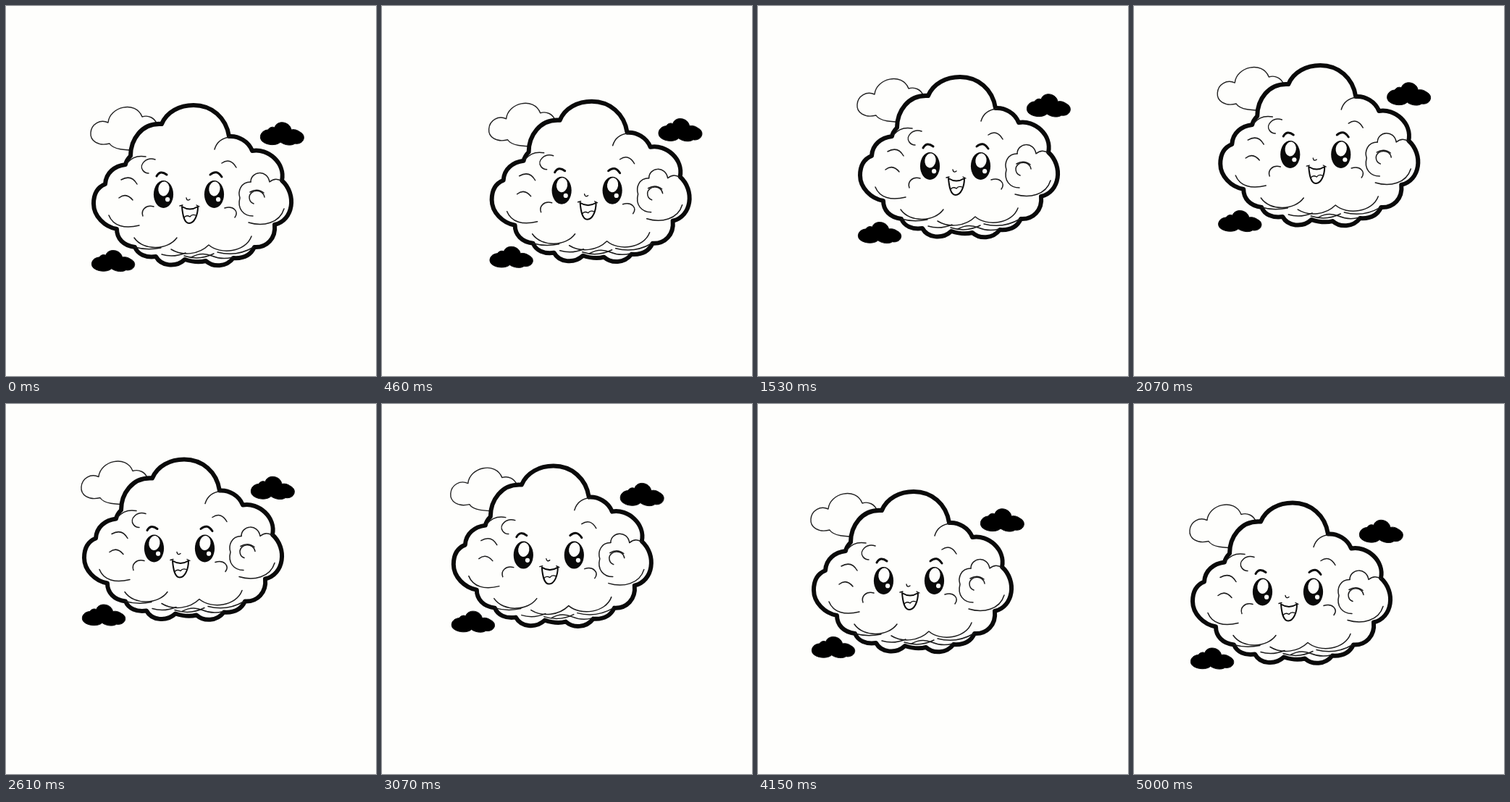
Write an HTML page that moves like this. It is 511 by 511 pixels and loops after 5070 ms.

```html
<!DOCTYPE html>
<html lang="en">
<head>
<meta charset="utf-8">
<title>Drifting cloud</title>
<style>
  html, body { margin: 0; width: 100%; height: 100%; overflow: hidden; background: #fefefc; }
  svg { display: block; width: 100vw; height: 100vh; }
  path { stroke: #0a0a0a; stroke-linecap: round; stroke-linejoin: round; }
  .small path { fill: #fefefc; stroke: #222; stroke-width: 1.4; }
  .body { fill: #fefefc; stroke-width: 6; }
  .folds path { fill: none; stroke: #1c1c1c; stroke-width: 1.5; }
  .brow { fill: none; stroke-width: 3; }
  .mouth { fill: #fefefc; stroke-width: 2; }
  .thin { fill: none; stroke-width: 1.3; }
  .shine { fill: #fefefc; }
</style>
</head>
<body>
<svg viewBox="0 0 511 511">
  <defs>
    <path id="puff" d="M362 171C353 171 348 181 354 187C361 193 374 193 379 188C386 193 395 193 399 190C411 192 416 179 406 174C402 171 398 170 394 171C392 159 374 157 371 168C368 166 363 168 362 171Z"/>
    <g id="eye">
      <ellipse rx="13.6" ry="19" fill="#0a0a0a"/>
      <ellipse class="shine" cx="-.6" cy="-7.5" rx="7.6" ry="10" transform="rotate(8)"/>
      <circle class="shine" cx="5.6" cy="7.2" r="3.1"/>
    </g>
  </defs>
  <g id="scene">
    <g class="small">
      <path d="M141 161C143 139 179 130 188 153C197 150 205 155 208 162L190 200C172 199 149 200 143 190C127 194 116 186 117 175C118 163 130 156 141 161Z"/>
      <use href="#puff"/>
      <use href="#puff" transform="translate(-229.5 188) scale(.99 .93)"/>
    </g>

    <path class="body" d="M215 163C222 146 240 137 259 137C284 137 304 154 308 180C321 179 335 187 340 200C362 196 386 217 381 241C402 260 397 296 371 302C373 321 360 334 343 333C338 344 328 349 314 348C304 361 286 361 276 352C265 355 256 353 247 350C234 362 214 359 207 346C193 348 182 343 178 333C162 331 153 321 153 308C136 305 121 290 121 273C121 259 127 250 137 246C138 230 150 221 165 219C166 214 169 210 172 207C172 185 187 161 215 163Z"/>

    <g class="folds">
      <path d="M167 217Q177 205 193 208"/>
      <path d="M206 212C194 208 183 219 189 227Q192 231 197 231"/>
      <path d="M159 240Q173 232 181 246"/>
      <path d="M156 265Q166 257 175 268"/>
      <path d="M204 277C193 274 186 282 189 290"/>
      <path d="M142 289C148 304 164 308 184 303"/>
      <path d="M177 320C190 339 224 337 236 320"/>
      <path d="M178 333Q195 338 214 334"/>
      <path d="M228 336C244 346 267 343 280 330C296 344 331 340 339 318"/>
      <path d="M215 343Q231 348 248 341"/>
      <path d="M246 345Q267 352 287 342"/>
      <path d="M256 347Q270 339 284 345T313 347"/>
      <path d="M292 340Q318 347 342 333"/>
      <path d="M288 198C291 188 298 182 310 181" stroke-width="2.2"/>
      <path d="M298 217Q310 209 318 223"/>
      <path d="M302 279C314 275 322 284 316 292"/>
      <path d="M338 243C338 228 361 225 364 243Q372 236 381 242"/>
      <path d="M338 243C324 243 320 256 323 265C319 280 328 290 341 290"/>
      <path d="M357 264C355 252 337 253 336 264Q336 271 342 273"/>
      <path d="M337 257Q347 251 356 258"/>
      <path d="M335 299C355 305 378 300 384 280"/>
    </g>

    <path class="brow" d="M208 235Q213 226 222 233"/>
    <path class="brow" d="M282 233Q291 225 298 236"/>
    <use href="#eye" x="217.5" y="260"/>
    <use href="#eye" x="287.5" y="260"/>
    <path class="thin" d="M249 265Q250 270 254 267"/>
    <path class="mouth" d="M243 277Q254 284 265 277C265 289 260 300 253 300C246 300 244 289 243 277Z"/>
    <path class="thin" d="M246 292Q249 288 254 291Q257 287 262 289M240 276L244 275M263 275L267 277"/>
  </g>
</svg>
<script>
  const LOOP = 5070;
  // time in ms, x, y
  const PATH = [
    [0, 0, 0], [270, 20, -1.5], [530, 33, -7], [920, 36, -18], [1070, 34, -23.5],
    [1530, 20, -39], [1610, 16.5, -42], [2150, -4.5, -57], [2400, -9.5, -61.5],
    [2610, -13, -60.5], [3230, -25.5, -47.5], [3530, -32, -37], [3760, -38, -28.5],
    [4150, -44, -16], [4300, -46.5, -11.5], [4600, -48, -4], [4840, -45.5, -1.5], [5000, -40, -.5]
  ];
  const scene = document.getElementById('scene');

  function slope(i, axis) {
    const a = PATH[Math.max(i - 1, 0)];
    const b = PATH[Math.min(i + 1, PATH.length - 1)];
    return (b[axis] - a[axis]) / (b[0] - a[0]);
  }

  // Cubic Hermite curve through the path points
  function position(t, axis) {
    let i = 0;
    while (i < PATH.length - 2 && t > PATH[i + 1][0]) i++;
    const a = PATH[i], b = PATH[i + 1];
    const span = b[0] - a[0];
    const u = Math.min((t - a[0]) / span, 1), v = 1 - u;
    return v * v * (1 + 2 * u) * a[axis] + u * u * (3 - 2 * u) * b[axis]
      + u * v * span * (v * slope(i, axis) - u * slope(i + 1, axis));
  }

  // 13 pictures per second, starting on whole hundredths
  function stepTime(t) {
    const hundredths = Math.floor(t / 10) + 1;
    const step = Math.ceil(hundredths * 13 / 100) - 1;
    return Math.floor(step * 100 / 13) * 10;
  }

  function draw() {
    const t = stepTime(performance.now() % LOOP);
    const x = position(t, 1).toFixed(2), y = position(t, 2).toFixed(2);
    scene.setAttribute('transform', `translate(${x} ${y})`);
    requestAnimationFrame(draw);
  }
  draw();
</script>
</body>
</html>
```
